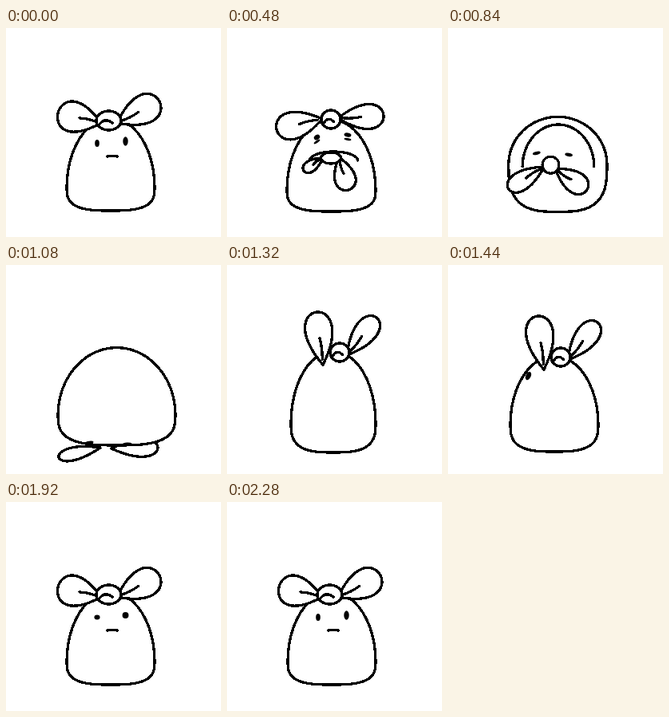
These frames come from a looping animation (269x262 px, 2.4 s). An HTML page:

```html
<!DOCTYPE html>
<html lang="en">
<head>
<meta charset="utf-8">
<title>Inside-out bundle</title>
<style>
  html, body { margin: 0; width: 100%; height: 100%; overflow: hidden; background: #fff; }
  svg { display: block; }
  path { stroke: #000; stroke-width: 3.3; stroke-linecap: round; stroke-linejoin: round; fill: none; shape-rendering: crispEdges; }
  .solid { fill: #fff; }
</style>
</head>
<body>
<svg id="stage" width="269" height="262" viewBox="0 0 269 262"></svg>
<script>
// Each pose holds a few measures per part and the order, back to front:
//   B      body: centre x, half width, top, widest y, bottom
//   L R    outer bow loops, l r inner ones: root x y, tip x y, half width
//   K k    outer and inner knot: centre x y, radii
//   m      mouth: centre x, base y, half width, rise
//   e f    eyes: centre x y, radii, tilt
//   g      gap between an eye and its bag
const rest = {
  order: 'BLRKmlrkgef',
  B: [131, 55, 113, 200, 229], m: [133, 161, 6, .5],
  L: [119, 119, 65, 107, 19], R: [139, 119, 192, 92, 18], K: [128.5, 116, 15.5, 12],
  l: [130, 162, 130, 162, 0], r: [130, 162, 130, 162, 0], k: [130, 162, 0, 0],
  e: [114, 144.5, 2.8, 4.5, 0], f: [149.5, 142, 3.2, 5.8, 0], g: [0]
};
const gag = {
  order: rest.order,
  B: [130.5, 55.5, 115, 203, 230], m: [133.5, 166, 30, 11],
  L: [119, 114, 62, 127, 17], R: [139, 113, 196, 110, 15.5], K: [130, 114.5, 12, 11.5],
  l: [120, 163, 96, 179, 7], r: [140, 162, 152, 203, 13], k: [130, 163, 12.5, 7],
  e: [112.5, 137, 4, 3, -35], f: [151, 134, 4.5, 2.5, 10], g: [5.5]
};
const spill = {
  order: 'LRKBmgeflrk',
  B: [137, 57.5, 114, 165, 232], m: [138, 168, 35, 41],
  L: [118, 116, 87, 128, 13], R: [139, 112, 174, 107, 11], K: [128, 113, 15, 7],
  l: [121, 155, 79, 188, 13], r: [135, 158, 168, 194, 14], k: [129, 155.5, 10.5, 11],
  e: [113, 134, 5, 2.2, -15], f: [151, 136, 4.5, 2.2, 15], g: [-10]
};
const dome = {
  order: 'lrBef',
  B: [138.5, 73.5, 103.5, 188, 226], m: [138, 190, 73, 86],
  l: [118, 229, 66, 241, 8], r: [132, 230, 190, 229, 11], k: [127, 218, 10, 9],
  e: [104.5, 222.5, 5, 1.8, -5], f: [151.5, 224.5, 6, 2, -3]
};
const squash = { order: 'B', B: [135.5, 73.5, 125, 200, 236] };
const turn = {
  order: 'BLRKef',
  B: [133, 55, 114, 200, 234],
  L: [120, 131, 112, 64, 17], R: [150, 119, 187, 72, 14], K: [141, 115.5, 12, 11.5],
  e: [95, 140, 0, 0, 15], f: [100.5, 139, 3.2, 5.5, 25]
};
const stretch = {
  order: 'BLRK',
  B: [133, 53, 108, 198, 235],
  L: [120, 125, 112, 59, 17], R: [150, 113, 187, 66, 14], K: [141, 109.5, 12, 11.5]
};
const front = {
  order: 'BLRKef',
  B: [131, 55.5, 113, 195, 234],
  L: [117, 119, 73, 93, 18], R: [142, 120, 191, 87, 17], K: [129.5, 117.5, 16, 13],
  e: [111, 139, 3, 6.5, 15], f: [141, 143, 2.8, 7, 2]
};

const STEP = 120, STEPS = 20, BLINK = 17;
const keys = [[0, rest], [4, gag], [6, spill], [9, dome], [10, squash],
  [11, stretch], [12, turn], [14, front], [15, rest], [STEPS, rest]];

const solid = d => `<path class="solid" d="${d}Z"/>`;
const line = d => `<path d="${d}"/>`;

// Path through point(u) for u from 0 to end
function trace(point, end) {
  const n = 48;
  return 'M' + Array.from({ length: n + 1 }, (_, i) => point(end * i / n).map(v => v.toFixed(2))).join('L');
}

// Half an ellipse on top, a squarer half below
function body([x, w, top, wide, bottom]) {
  const square = v => Math.sign(v) * Math.abs(v) ** (2 / 3);
  return solid(trace(u => {
    const c = Math.cos(u), s = Math.sin(u);
    return s > 0 ? [x + w * c, wide - (wide - top) * s]
                 : [x + w * square(c), wide - (bottom - wide) * square(s)];
  }, 2 * Math.PI));
}

// Teardrop with its point at the root, and a crease along the middle
function loop([x, y, tx, ty, w], creased) {
  if (!w) return '';
  const dx = tx - x, dy = ty - y, len = Math.hypot(dx, dy);
  const at = (along, side) => [x + dx * along - dy / len * side, y + dy * along + dx / len * side];
  const drop = trace(u => at((1 - Math.cos(u)) / 2, w * Math.sin(u) * Math.sin(u / 2) / .77), 2 * Math.PI);
  return solid(drop) + (creased ? line(`M${at(.1, 0)}Q${at(.3, 2)} ${at(.5, 0)}`) : '');
}

function knot([x, y, rx, ry], curled) {
  if (!rx) return '';
  const at = (u, v) => [x + rx * u, y + ry * v];
  const ring = trace(u => at(Math.cos(u), Math.sin(u)), 2 * Math.PI);
  return solid(ring) + (curled ? line(`M${at(-.75, .4)}Q${at(-.3, -.35)} ${at(.3, .25)}`) : '');
}

const mouth = ([x, y, w, rise]) =>
  line(trace(u => [x - w * Math.cos(u), y - rise * Math.sin(u)], Math.PI));

const eye = ([x, y, rx, ry, tilt], shut = 0) =>
  `<ellipse rx="${rx + 1.5 * shut}" ry="${ry * (1 - .65 * shut)}" transform="translate(${x} ${y}) rotate(${tilt})"/>`;

const bags = (pose, gap) => Math.abs(gap) < 2 ? '' :
  [pose.e, pose.f].map(([x, y, , , tilt]) => eye([x, y + gap, 4.5, 1.4, tilt])).join('');

function poseAt(step) {
  const i = keys.findLastIndex(([start]) => start <= step);
  const [start, from] = keys[i], [end, to] = keys[i + 1];
  if (step === start) return from;
  const t = (step - start) / (end - start), ease = t * t * (3 - 2 * t);
  const pose = { order: from.order };
  for (const part in from)
    if (part !== 'order' && to[part])
      pose[part] = from[part].map((v, j) => v + (to[part][j] - v) * ease);
  return pose;
}

function draw(step) {
  const pose = poseAt(step), { order } = pose;
  const shut = Math.max(0, 1 - Math.abs(step - BLINK) / 2);
  return [...order].filter(part => pose[part]).map(part => {
    const size = pose[part];
    const inFront = order.indexOf(part) > order.indexOf('B');
    if (part === 'B') return body(size);
    if (part === 'm') return mouth(size);
    if (part === 'g') return bags(pose, size[0]);
    if ('ef'.includes(part)) return eye(size, shut);
    if ('Kk'.includes(part)) return knot(size, part === 'K');
    return loop(size, inFront);
  }).join('');
}

const stage = document.getElementById('stage');
let shown = -1;
function tick() {
  const step = Math.floor(performance.now() / STEP) % STEPS;
  if (step !== shown) stage.innerHTML = draw(shown = step);
  requestAnimationFrame(tick);
}
tick();
</script>
</body>
</html>
```
